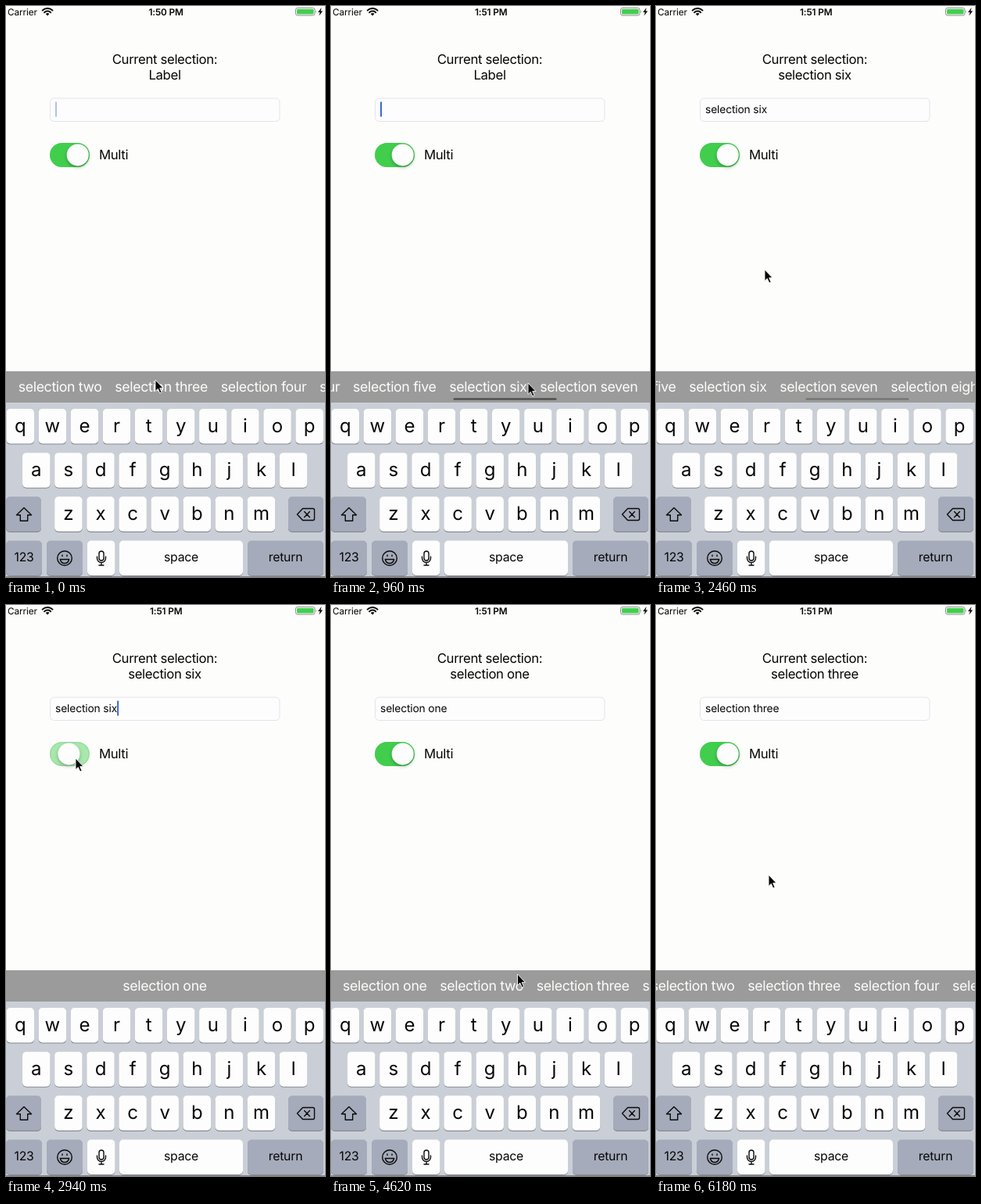
Recreate the animation shown at these times as an HTML page. Size 408x730 px, loop 6240 ms.

```html
<!DOCTYPE html>
<html lang="en">
<head>
<meta charset="utf-8">
<title>Keyboard selection bar</title>
<style>
  html, body { margin: 0; width: 100%; height: 100%; overflow: hidden; background: #fdfdfb; }
  svg { display: block; width: 408px; height: 730px; font-family: Inter, Roboto, sans-serif; text-rendering: geometricPrecision; }
  .mid { text-anchor: middle; }
  .body { font-size: 16.75px; letter-spacing: -.021em; }
  .field { font-size: 13.8px; letter-spacing: -.01em; }
  .item { font-size: 17.74px; letter-spacing: -.02em; fill: #fdfdfb; }
  .status { font-size: 11.8px; letter-spacing: -.01em; }
  .letter { font-size: 24px; }
  .word { font-size: 15.8px; letter-spacing: -.015em; }
  .line { fill: none; stroke: #0b0b0b; stroke-width: 1.4; stroke-linejoin: round; stroke-linecap: round; }
  #knob { filter: drop-shadow(0 2px 2px #0004); }
</style>
</head>
<body>
<svg viewBox="0 0 408 730" fill="#060606">
  <rect width="408" height="730" fill="#fdfdfb"/>

  <text class="status" x="2" y="11.5">Carrier</text>
  <path class="line" style="stroke-width:2" d="M46.7 5.6a9 9 0 0 1 12.8 0M49.1 8.2a5.6 5.6 0 0 1 8 0"/>
  <path d="M53.1 12.6l-2.3-2.6a3.3 3.3 0 0 1 4.6 0z"/>
  <text class="status mid" id="clock" x="204.7" y="11.5" font-weight="600"></text>
  <rect x="370.5" y="2.5" width="24.5" height="9.5" rx="2.4" fill="none" stroke="#8c8c8c"/>
  <rect x="372" y="4" width="21.5" height="6.5" rx="1.2" fill="#43cf50"/>
  <path d="M396.3 5.5q1.6 1.8 0 3.6z" fill="#8c8c8c"/>
  <path d="M403.6 2l-4.6 6h2.6l-1.2 4.6 4.7-6.2h-2.7z"/>

  <text class="body mid" x="203" y="73.5">Current selection:</text>
  <text class="body mid" id="label" x="203" y="93.8"></text>

  <rect x="56.5" y="118" width="293.5" height="29.5" rx="5" fill="#fdfdfd" stroke="#e3e3ee"/>
  <text class="field" id="field" x="63" y="137"></text>
  <rect id="caret" y="122.5" width="2" height="19" fill="#4068d0"/>

  <rect x="56.7" y="175.7" width="49.4" height="29.6" rx="14.8" fill="#fdfdfb" stroke="#e6e6e6" stroke-width="1.5"/>
  <rect id="green" x="56" y="175" width="51" height="31" rx="15.5" fill="#41ce4d"/>
  <circle id="knob" cy="190.4" r="14" fill="#fdfdfd"/>
  <text class="body" x="119" y="196.3">Multi</text>

  <rect y="467" width="408" height="40" fill="#9b9b9b"/>
  <g id="multi"></g>
  <text class="item mid" id="single" x="203" y="493">selection one</text>
  <rect id="thumb" y="501.3" width="132" height="2.5" rx="1.25" fill="#505050"/>

  <rect y="507" width="408" height="223" fill="#cacfd7"/>
  <g id="keys"></g>
  <rect y="729" width="408" height="1" fill="#80848c"/>

  <path class="line" d="M23 641.5l9.5 9.3h-4.8v7.4h-9.4v-7.4h-4.8z"/>
  <path class="line" d="M379.5 642.5h13q2 0 2 2v11q0 2-2 2h-13l-7-7.5zM381.6 646.6l6.8 6.8m0-6.8l-6.8 6.8"/>
  <circle class="line" cx="75" cy="706" r="9.3"/>
  <path class="line" d="M69.3 707.5h11.4q-1.2 5-5.7 5t-5.7-5zM72 702v1.4M78 702v1.4"/>
  <path class="line" d="M119 700a3 3 0 0 1 6 0v6a3 3 0 0 1-6 0zM116.5 704v2a5.5 5.5 0 0 0 11 0v-2M122 711.6v3.4m-3 0h6"/>

  <path id="cursor" d="M0 0V14.4L3.3 11.4L5.8 17L8.1 16L5.7 10.6H10Z" fill="#050505" stroke="#fdfdfd" stroke-width=".9"/>
</svg>
<script>
const LOOP = 6240, STEP = 60;
const $ = id => document.getElementById(id);
const clamp = v => Math.max(0, Math.min(1, v));
const ease = v => { const u = clamp(v); return u * u * (3 - 2 * u); };

function add(parent, tag, attrs, text = "") {
  const node = document.createElementNS("http://www.w3.org/2000/svg", tag);
  for (const name in attrs) node.setAttribute(name, attrs[name]);
  node.textContent = text;
  return parent.appendChild(node);
}

// Keyboard
const PITCH = 41.1, KEY = 35.5, DARK = "#a5abba";
const rowTop = r => 515 + r * 56.15;

function key(x, row, width, label = "", style = "letter", fill = "#fdfdfd") {
  const y = rowTop(row), box = { x, width, height: 44.5, rx: 5 };
  add($("keys"), "rect", { ...box, y: y + 1.1, fill: "#878b92" });
  add($("keys"), "rect", { ...box, y, fill });
  const baseline = y + (style === "letter" ? 29.5 : 26.3);
  add($("keys"), "text", { class: style + " mid", x: x + width / 2, y: baseline }, label);
}

["qwertyuiop", "asdfghjkl", "zxcvbnm"].forEach((letters, row) => {
  const left = 203.2 - (letters.length * PITCH - (PITCH - KEY)) / 2;
  [...letters].forEach((c, i) => key(left + i * PITCH, row, KEY, c));
});
key(0, 2, 45, "", "word", DARK);
key(361, 2, 45, "", "word", DARK);
key(0, 3, 46, "123", "word", DARK);
key(52, 3, 46, "", "word", DARK);
key(104, 3, KEY);
key(145, 3, 158, "space", "word");
key(309, 3, 97, "return", "word", DARK);

// Strip of choices, laid out by text width
let right = 15;
for (const word of "one two three four five six seven eight nine ten".split(" ")) {
  const item = add($("multi"), "text", { class: "item", x: right, y: 493 }, "selection " + word);
  right += item.getComputedTextLength() + 16.7;
}

// Gestures drive the cursor, the scrolling and the state
const OFF_AT = 2880, ON_AT = 4020, FIRST_OFFSET = 123.5;
const swipes = [
  { at: 120, span: 480, x: 350, y: 480, by: 298 },
  { at: 720, span: 480, x: 327, y: 482, by: 150 },
  { at: 1980, span: 120, x: 223, y: 478, by: 34 },
  { at: 4740, span: 420, x: 254.5, y: 501, by: 145.5 }
];
const taps = [
  { at: 0, x: 191, y: 478 },
  { at: 1560, x: 112, y: 480, picks: "selection six" },
  { at: OFF_AT, x: 89, y: 196 },
  { at: 3540, x: 200, y: 481, picks: "selection one" },
  { at: ON_AT, x: 86, y: 194 },
  { at: 5640, x: 165, y: 480, picks: "selection three" },
  { at: LOOP, x: 144, y: 345 }
];
const stops = [
  ...taps.flatMap(p => [{ ...p, at: p.at - 60 }, { ...p, at: p.at + 90 }]),
  ...swipes.flatMap(s => [s, { at: s.at + s.span, x: s.x - s.by, y: s.y }])
].sort((a, b) => a.at - b.at);

function cursorAt(t) {
  const i = stops.findLastIndex(s => s.at <= t);
  const a = stops[i], b = stops[i + 1];
  const e = ease((t - a.at) / (b.at - a.at));
  return [a.x + (b.x - a.x) * e, a.y + (b.y - a.y) * e];
}

function offsetAt(t) {
  const again = t >= ON_AT;
  return swipes
    .filter(s => s.at >= ON_AT === again)
    .reduce((sum, s) => sum + s.by * ease((t - s.at) / s.span), again ? 0 : FIRST_OFFSET);
}

const thumbAlpha = t => Math.max(...swipes.map(s =>
  t < s.at ? 0 : clamp((s.at + s.span + 480 - t) / 240)));

function caretAlpha(age) {
  const p = age % 1200;
  return p < 600 ? clamp((540 - p) / 80) : clamp((p - 1120) / 80);
}

function draw(t) {
  const set = (id, name, value) => $(id).setAttribute(name, value);
  const [x, y] = cursorAt(t);
  const offset = offsetAt(t);
  const pick = taps.findLast(p => p.picks && p.at <= t) || { at: -508, picks: "" };
  const on = t < ON_AT ? 1 - clamp((t - OFF_AT) / 110) : clamp((t - ON_AT) / 110);
  const single = t >= OFF_AT && t < ON_AT;

  $("clock").textContent = t < 840 ? "1:50 PM" : "1:51 PM";
  $("label").textContent = pick.picks || "Label";
  $("field").textContent = pick.picks;
  set("caret", "x", 63 + $("field").getComputedTextLength());
  set("caret", "opacity", caretAlpha(t - pick.at));

  set("green", "opacity", on);
  set("knob", "cx", 71 + 20.7 * on);

  set("multi", "visibility", single ? "hidden" : "visible");
  set("single", "visibility", single ? "visible" : "hidden");
  set("multi", "transform", `translate(${-offset})`);
  set("thumb", "opacity", single ? 0 : thumbAlpha(t));
  set("thumb", "x", Math.max(2, offset * .3205 - 2.6));

  set("cursor", "transform", `translate(${x} ${y})`);
}

const start = performance.now();
function tick() {
  const t = (performance.now() - start) % LOOP;
  draw(Math.floor(t / STEP) * STEP);
  requestAnimationFrame(tick);
}
tick();
</script>
</body>
</html>
```
